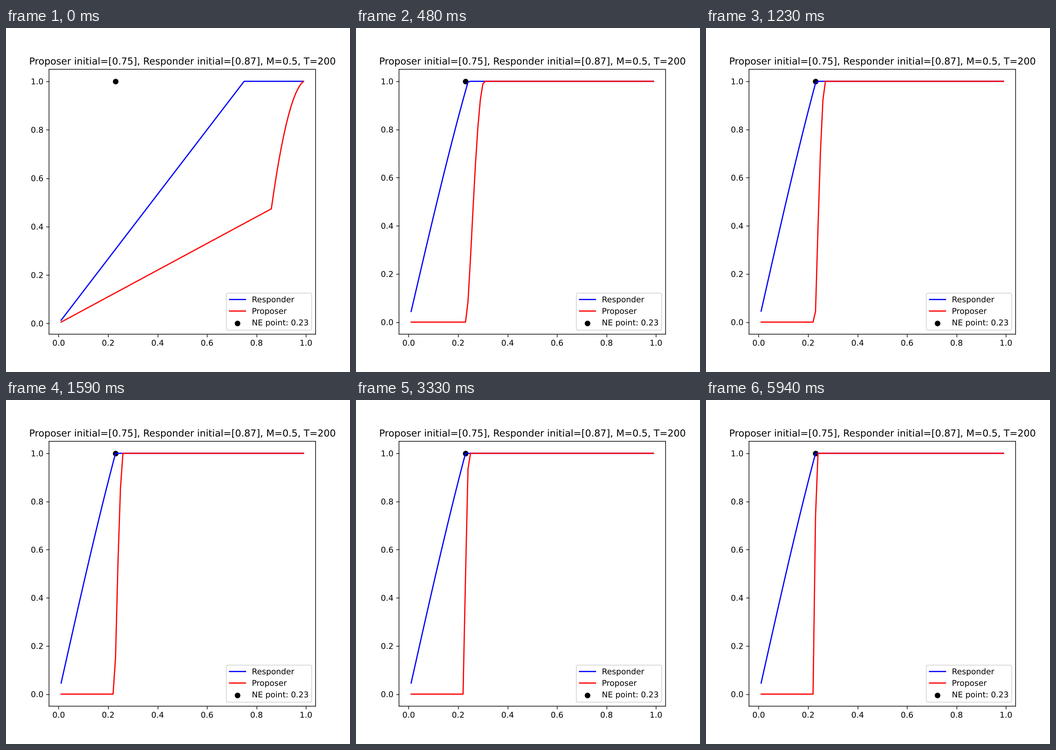
A matplotlib script for the animation above (5970 ms loop, 748 px wide and 748 px high).

```python
import matplotlib.pyplot as plt
import numpy as np
from matplotlib.animation import FuncAnimation
from matplotlib.patheffects import Normal

SIZE = 748
STEPS = 199
INTERVAL = 30
ETA = 0.5
OFFER, DEMAND = 0.75, 0.87
NE = 0.23

# Smooth sub-pixel rendering: no snapping, text drawn as unhinted outlines.
plt.rcParams.update({
    "path.snap": False,
    "path.effects": [Normal()],
    "text.hinting": "no_hinting",
})

grid = np.arange(1, 100) / 100


def pure(value):
    return np.isclose(grid, value).astype(float)


def project(v):
    """Euclidean projection onto the probability simplex."""
    u = np.sort(v)[::-1]
    excess = (np.cumsum(u) - 1) / np.arange(1, len(u) + 1)
    theta = excess[np.nonzero(u > excess)[0][-1]]
    return np.maximum(v - theta, 0)


def play(steps):
    """Both players follow the regularized leader; returns their CDFs."""
    prop, resp = pure(OFFER), pure(DEMAND)
    prop_gain = np.zeros_like(grid)
    resp_gain = np.zeros_like(grid)
    history = []
    for _ in range(steps):
        prop_gain += (1 - grid) * np.cumsum(resp)
        resp_gain += np.cumsum((grid * prop)[::-1])[::-1]
        prop, resp = project(ETA * prop_gain), project(ETA * resp_gain)
        history.append((np.cumsum(resp), np.cumsum(prop)))
    return history


history = play(STEPS)

fig, ax = plt.subplots(figsize=(6, 6), dpi=SIZE / 6)
resp_line, = ax.plot(grid, history[0][0], color="blue", label="Responder")
prop_line, = ax.plot(grid, history[0][1], color="red", label="Proposer")
ax.scatter([NE], [1], color="black", label=f"NE point: {NE}")
ax.set_title(f"Proposer initial=[{OFFER}], Responder initial=[{DEMAND}], "
             f"M={ETA}, T={STEPS + 1}")
ax.legend(loc="lower right")


def update(i):
    resp, prop = history[i]
    resp_line.set_ydata(resp)
    prop_line.set_ydata(prop)
    low = min(resp[0], prop[0])
    pad = 0.05 * (1 - low)
    ax.set_ylim(low - pad, 1 + pad)
    return resp_line, prop_line


anim = FuncAnimation(fig, update, frames=STEPS, interval=INTERVAL,
                     repeat=True, repeat_delay=0, blit=False)
plt.show()
```
